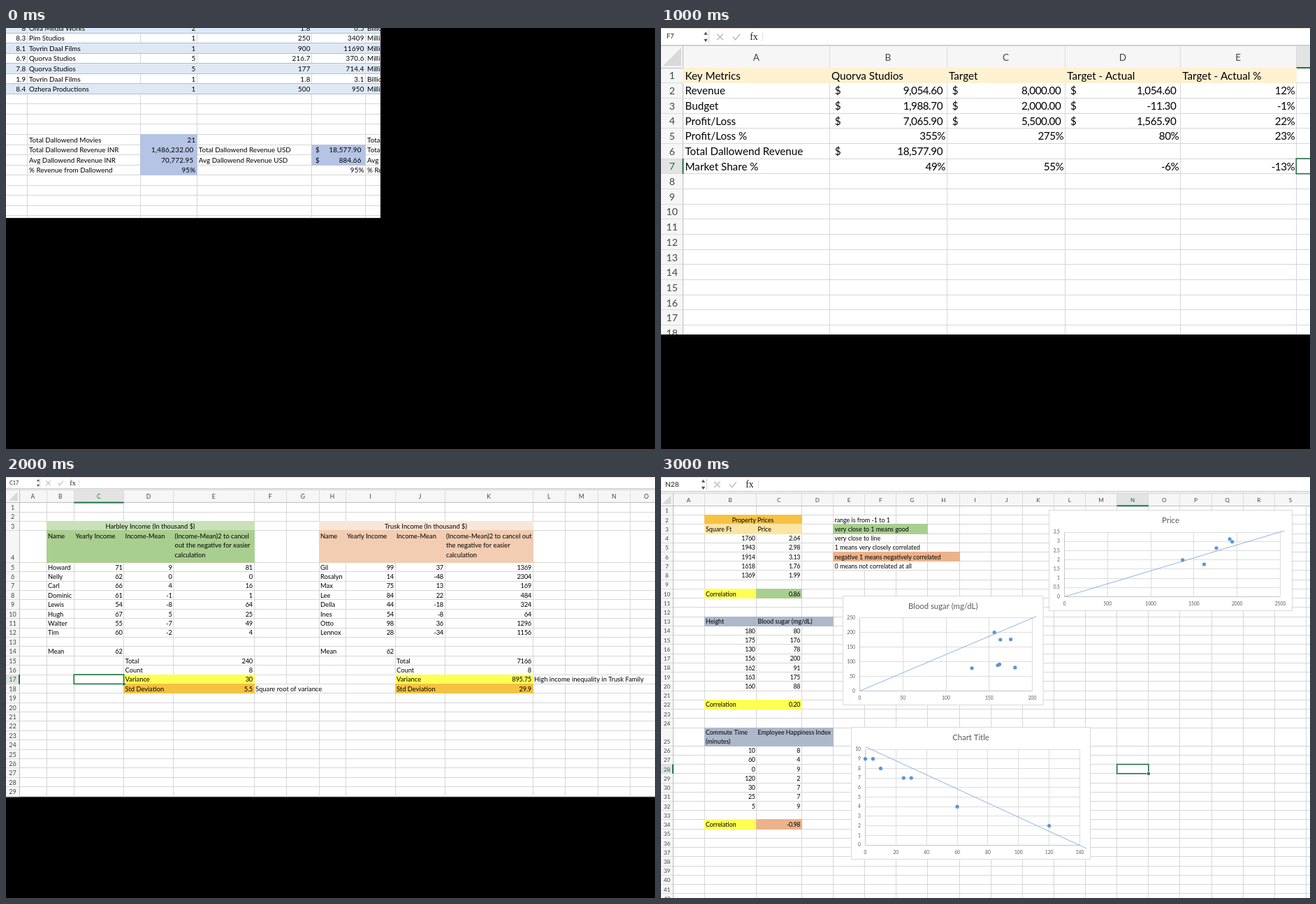
An HTML page with a canvas that plays this animation: 929 by 603 pixels, repeating every 4000 ms.

```html
<!DOCTYPE html>
<html lang="en">
<head>
<meta charset="utf-8">
<title>Spreadsheet slides</title>
<style>
html, body { margin: 0; width: 100%; height: 100%; overflow: hidden; background: #000; }
canvas { display: block; }
</style>
</head>
<body>
<canvas id="stage" width="929" height="603"></canvas>
<script>
const W = 929, H = 603;
const ctx = document.getElementById('stage').getContext('2d');
const GREEN = '#1f7244', GRID = '#d6d6d6', YELLOW = '#ffff54', AMBER = '#f5c242';
const SAGE = '#a9cf90', PEACH = '#ecb28a', SLATE = '#adb9ca';
let sheet; // geometry of the sheet being drawn

function rect(x0, y0, x1, y1, color) {
  ctx.fillStyle = color;
  ctx.fillRect(x0, y0, x1 - x0, y1 - y0);
}
const snap = v => Math.round(v - 0.5);
const hline = (x0, x1, y, color = GRID) => rect(x0, snap(y), x1, snap(y) + 1, color);
const vline = (x, y0, y1, color = GRID) => rect(snap(x), y0, snap(x) + 1, y1, color);

function path(points, color, width, fill) {
  ctx.beginPath();
  points.forEach(([x, y]) => ctx.lineTo(x, y));
  ctx.strokeStyle = ctx.fillStyle = color;
  ctx.lineWidth = width;
  fill ? ctx.fill() : ctx.stroke();
}

// y is the middle of the capitals
function text(str, x, y, size, align = 'left', color = '#000', track = 0, font = 'Lato, Carlito, sans-serif') {
  ctx.font = `${size}px ${font}`;
  ctx.letterSpacing = `${track * size}px`;
  ctx.textAlign = align;
  ctx.fillStyle = color;
  ctx.fillText(str, x, y + size * 0.36);
}

function rowEdges(top, pitch, count, tall, tallHeight) {
  const ys = [top];
  for (let r = 1; r <= count; r++) ys.push(ys[r - 1] + (r === tall ? tallHeight : pitch));
  return ys;
}

function parse(ref) {
  return [ref.charCodeAt(0) - 65, +ref.slice(1)];
}

function bounds(range) {
  const [a, b = a] = range.split(':');
  const [c0, r0] = parse(a), [c1, r1] = parse(b);
  return [sheet.xs[c0], sheet.ys[r0 - 1], sheet.xs[c1 + 1], sheet.ys[r1]];
}

function fill(range, color) {
  const [x0, y0, x1, y1] = bounds(range).map(v => snap(v));
  rect(x0, y0, x1 + 1, y1 + 1, color);
}

// hides the grid lines under text that runs over several cells
function spill(range) {
  const [x0, y0, x1, y1] = bounds(range).map(v => snap(v));
  rect(x0 + 1, y0 + 1, x1, y1, '#fff');
}

function put(ref, value, align, dx = 0) {
  const [x0, y0, x1, y1] = bounds(ref);
  const str = String(value), number = /^[\d.,%-]+$/.test(str);
  const side = align || (number ? 'right' : 'left');
  const x = { left: x0 + sheet.pad, right: x1 - 2, center: (x0 + x1) / 2 }[side] + dx;
  text(str, x, (y0 + y1) / 2 + 0.3, sheet.size, side, '#000', number ? sheet.track : 0);
}

function column(ref, values) {
  const [, row] = parse(ref);
  values.forEach((v, i) => v !== '' && put(ref[0] + (row + i), v));
}

function money(ref, value, dx) {
  put(ref, '$', 'left', dx);
  put(ref, value, 'right', -4);
}

function grid(right, bottom) {
  const { xs, ys } = sheet;
  rect(0, 0, right, bottom, '#fff');
  ys.forEach(y => hline(0, right, y));
  xs.forEach(x => vline(x, ys[0], bottom));
}

function formulaBar({ name, nameX, nameY, nameSize, k, end, step, cross, check, fx, sep, height }) {
  const mid = nameY + 0.8 * k;
  rect(0, 0, W, height, '#fff');
  rect(0, 0, W, 1, '#eadfd0');
  hline(0, W, height, '#c9c9c9');
  vline(end, 2, height - 2, '#cfcfcf');
  vline(sep, mid - 6 * k, mid + 6 * k, '#dcdcdc');
  text(name, nameX, nameY, nameSize, 'left', '#222');
  for (const d of [-1, 1]) {
    const y = mid + d * 3 * k;
    path([[step - 2.7 * k, y], [step + 2.7 * k, y], [step, y + d * 4.5 * k]], '#555', 1, true);
  }
  const a = 4.3 * k, grey = '#bcbcbc';
  path([[cross - a, mid - a], [cross + a, mid + a]], grey, 1.5 * k);
  path([[cross + a, mid - a], [cross - a, mid + a]], grey, 1.5 * k);
  path([[check - 5 * k, mid], [check - 1.5 * k, mid + 4 * k], [check + 5 * k, mid - 4 * k]], grey, 1.5 * k);
  text('fx', fx, mid - 0.5, 14 * k, 'center', '#222', 0, 'italic 14px "Liberation Serif", serif'.replace(/^italic 14px /, ''));
}

function workbook(s) {
  sheet = s;
  const { xs, ys, bar, bottom, pitch, active, headTop } = s;
  const left = xs[0], top = ys[0], [ac, ar] = parse(active);
  grid(W, bottom);
  rect(0, 0, W, top, '#f0f0f0');
  formulaBar(bar);
  rect(0, headTop, W, top, '#f6f6f6');
  rect(0, top, left, bottom, '#f6f6f6');
  rect(xs[ac], headTop, xs[ac + 1], top, '#e3e3e3');
  rect(0, ys[ar - 1], left, ys[ar], '#e3e3e3');
  hline(0, W, headTop, '#d4d4d4');
  hline(0, W, top, '#bdbdbd');
  vline(left, headTop, bottom, '#bdbdbd');
  const e = left - 2.5, b = top - 2.5, t = headTop + 3;
  path([[e, t], [e, b], [e - (b - t), b]], '#d9d9d9', 1, true);
  for (let c = 0; c < xs.length - 1; c++) {
    if (c) vline(xs[c], headTop, top, '#dcdcdc');
    text(String.fromCharCode(65 + c), (xs[c] + xs[c + 1]) / 2, (headTop + top) / 2 + 0.7,
      s.letterSize, 'center', c === ac ? GREEN : '#444');
  }
  for (let r = 1; r < ys.length; r++) {
    hline(0, left, ys[r], '#dcdcdc');
    text(r, left / 2, ys[r] - pitch / 2 + 0.4, s.rowSize, 'center', r === ar ? GREEN : '#444');
  }
  rect(xs[ac], top - 1, xs[ac + 1], top + 1, GREEN);
  rect(left - 1, ys[ar - 1], left + 1, ys[ar], GREEN);
}

function selection(ref) {
  const [x0, y0, x1, y1] = bounds(ref);
  ctx.strokeStyle = GREEN;
  ctx.lineWidth = 1.6;
  ctx.strokeRect(x0, y0, x1 - x0, y1 - y0);
  rect(x1 - 2.5, y1 - 2.5, x1 + 2.5, y1 + 2.5, '#fff');
  rect(x1 - 1.8, y1 - 1.8, x1 + 2, y1 + 2, GREEN);
}

function chart({ box, plot, title, max, step, points, trend }) {
  const [bx0, by0, bx1, by1] = box, [x0, y0, x1, y1] = plot;
  const px = v => x0 + v / max[0] * (x1 - x0), py = v => y1 - v / max[1] * (y1 - y0);
  rect(bx0, by0, bx1, by1, '#fff');
  ctx.strokeStyle = '#d9d9d9';
  ctx.lineWidth = 1;
  ctx.strokeRect(bx0, by0, bx1 - bx0, by1 - by0);
  for (let v = 0; v <= max[0]; v += step[0]) {
    vline(px(v), y0, y1, v ? '#dcdcdc' : '#c4c4c4');
    text(v, px(v), y1 + 10.2, 6.7, 'center', '#595959');
  }
  for (let v = 0; v <= max[1]; v += step[1]) {
    hline(x0, x1, py(v), v ? '#dcdcdc' : '#c4c4c4');
    text(v, x0 - 6.5, py(v) - 0.2, 6.7, 'right', '#595959');
  }
  text(title, (bx0 + bx1) / 2, by0 + 14, 11.3, 'center', '#595959');
  path(trend, '#83abdd', 0.9);
  ctx.fillStyle = '#5b95d5';
  for (const [x, y] of points) {
    ctx.beginPath();
    ctx.arc(px(x), py(y), 2.6, 0, 7);
    ctx.fill();
  }
}

function revenue() {
  const right = 536, bottom = 272.5;
  sheet = { xs: [-1, 30.5, 192.3, 273.3, 437.6, 514.6, 600], ys: rowEdges(-7.2, 14.52, 20), size: 9.85, track: 0.018, pad: 2.5 };
  ctx.beginPath();
  ctx.rect(0, 0, right, bottom);
  ctx.clip();
  grid(right, bottom);
  for (let r = 1; r <= 7; r++) {
    if (r % 2) fill(`A${r}:F${r}`, '#dfe9f5');
  }
  for (let r = 1; r <= 7; r++) hline(0, right, sheet.ys[r], '#a3c3e3');
  fill('C12:C15', '#b5c3e4');
  fill('E13:E14', '#b5c3e4');
  column('A1', [8, 8.3, 8.1, 6.9, 7.8, 1.9, 8.4]);
  column('B1', ['Olva Media Works', 'Pim Studios', 'Tovrin Daal Films', 'Quorva Studios', 'Quorva Studios',
    'Tovrin Daal Films', 'Ozhera Productions']);
  column('C1', [2, 1, 1, 5, 5, 1, 1]);
  column('D1', [1.8, 250, 900, 216.7, 177, 1.8, 500]);
  column('E1', [6.5, 3409, 11690, 370.6, 714.4, 3.1, 950]);
  column('F1', ['Billion', 'Million', 'Million', 'Million', 'Million', 'Billion', 'Million']);
  column('B12', ['Total Dallowend Movies', 'Total Dallowend Revenue INR', 'Avg Dallowend Revenue INR', '% Revenue from Dallowend']);
  put('C12', 21);
  put('C13', '1,486,232.00', 'right', -3);
  put('C14', '70,772.95', 'right', -3);
  put('C15', '95%');
  column('D13', ['Total Dallowend Revenue USD', 'Avg Dallowend Revenue USD']);
  money('E13', '18,577.90', 3);
  money('E14', '884.66', 3);
  put('E15', '95%');
  column('F12', ['Total', 'Total', 'Avg Dallowend', '% Revenue']);
}

function metrics() {
  workbook({
    xs: [31.5, 241, 409, 578.3, 743.3, 909.3, 1075], ys: rowEdges(57, 21.68, 18), pitch: 21.68, bottom: 439,
    headTop: 25, active: 'F7', size: 15.2, track: -0.029, pad: 3, letterSize: 13.6, rowSize: 14.2,
    bar: { name: 'F7', nameX: 8, nameY: 12, nameSize: 9.3, k: 1, end: 68.5, step: 64, cross: 84.5,
      check: 108, fx: 133, sep: 145, height: 24 }
  });
  fill('A1:E1', '#fdf1d0');
  ['Key Metrics', 'Quorva Studios', 'Target', 'Target - Actual', 'Target - Actual %']
    .forEach((h, i) => put('ABCDE'[i] + 1, h));
  column('A2', ['Revenue', 'Budget', 'Profit/Loss', 'Profit/Loss %', 'Total Dallowend Revenue', 'Market Share %']);
  const amounts = {
    B: ['9,054.60', '1,988.70', '7,065.90'],
    C: ['8,000.00', '2,000.00', '5,500.00'],
    D: ['1,054.60', '-11.30', '1,565.90']
  };
  for (const c in amounts) amounts[c].forEach((v, i) => money(c + (i + 2), v, 4.7));
  money('B6', '18,577.90', 4.7);
  column('B5', ['355%', '', '49%']);
  column('C5', ['275%', '', '55%']);
  column('D5', ['80%', '', '-6%']);
  column('E2', ['12%', '-1%', '22%', '23%', '', '-13%']);
  selection('F7');
}

function incomeTable(cols, family, tints, names, incomes, gaps, squares, totals) {
  const [a, b, c, d] = cols;
  fill(`${a}3:${d}3`, tints[0]);
  fill(`${a}4:${d}4`, tints[1]);
  fill(`${c}17:${d}17`, YELLOW);
  fill(`${c}18:${d}18`, AMBER);
  const [x0, , x1] = bounds(`${a}3:${d}3`);
  text(`${family} Income (In thousand $)`, (x0 + x1) / 2, 70.4, sheet.size, 'center');
  const head = (col, lines) => lines.forEach((s, i) => text(s, bounds(col + 4)[0] + 2, 84.2 + i * 13.5, sheet.size));
  head(a, ['Name']);
  head(b, ['Yearly Income']);
  head(c, ['Income-Mean']);
  head(d, ['(Income-Mean)2 to cancel', ...(a === 'B'
    ? ['out the negative for easier', 'calculation'] : ['the negative for easier', 'calculation'])]
    .map((s, i) => a === 'H' && !i ? s + ' out' : s));
  column(a + 5, [...names, '', 'Mean']);
  column(b + 5, [...incomes, '', 62]);
  column(c + 5, [...gaps, '', '', 'Total', 'Count', 'Variance', 'Std Deviation']);
  column(d + 5, [...squares, '', '', ...totals]);
}

function variance() {
  workbook({
    xs: [19, 58, 97.3, 168.6, 239.6, 355, 401.5, 448, 486, 557, 628, 754, 800.5, 847, 893.5, 940],
    ys: rowEdges(36.6, 13.4, 29, 4, 45.4), pitch: 13.4, bottom: 458.5,
    headTop: 18.5, active: 'C17', size: 9.35, track: -0.029, pad: 2, letterSize: 8.5, rowSize: 9,
    bar: { name: 'C17', nameX: 5, nameY: 8, nameSize: 7.3, k: 0.74, end: 48.5, step: 46, cross: 60.5,
      check: 78, fx: 95.5, sep: 104, height: 16 }
  });
  spill('F18:H18');
  spill('L17:O17');
  incomeTable('BCDE', 'Harbley', ['#c9e0b8', SAGE],
    ['Howard', 'Nelly', 'Carl', 'Dominic', 'Lewis', 'Hugh', 'Walter', 'Tim'],
    [71, 62, 66, 61, 54, 67, 55, 60], [9, 0, 4, -1, -8, 5, -7, -2],
    [81, 0, 16, 1, 64, 25, 49, 4], [240, 8, 30, 5.5]);
  incomeTable('HIJK', 'Trusk', ['#fae6d9', '#f2cdb2'],
    ['Gil', 'Rosalyn', 'Max', 'Lee', 'Della', 'Ines', 'Otto', 'Lennox'],
    [99, 14, 75, 84, 44, 54, 98, 28], [37, -48, 13, 22, -18, -8, 36, -34],
    [1369, 2304, 169, 484, 324, 64, 1296, 1156], [7166, 8, 895.75, 29.9]);
  put('F18', 'Square root of variance');
  put('L17', 'High income inequality in Trusk Family');
  selection('C17');
}

function correlation() {
  const xs = [17, 62, 136.5, 201];
  for (let i = 0; i <= 15; i++) xs.push(246.5 + i * 45.13);
  workbook({
    xs, ys: rowEdges(41.3, 13.24, 42, 25, 26), pitch: 13.24, bottom: H,
    headTop: 23, active: 'N28', size: 8.9, track: -0.04, pad: 2, letterSize: 8.2, rowSize: 8.4,
    bar: { name: 'N28', nameX: 6, nameY: 10, nameSize: 10.3, k: 0.98, end: 65.5, step: 60.5, cross: 80.5,
      check: 103, fx: 127, sep: 139, height: 20.5 }
  });
  fill('B2:C2', AMBER);
  fill('B3:C3', '#fce5a2');
  fill('E3:G3', SAGE);
  fill('E6:H6', PEACH);
  fill('B13:D13', SLATE);
  fill('B25:D25', SLATE);
  fill('B10', YELLOW);
  fill('C10', SAGE);
  fill('B22:C22', YELLOW);
  fill('B34', YELLOW);
  fill('C34', PEACH);
  ['E2:F2', 'E4:F4', 'E5:G5', 'E7:G7'].forEach(spill);

  const area = [1760, 1943, 1914, 1618, 1369], price = [2.64, 2.98, 3.13, 1.76, 1.99];
  const height = [180, 175, 130, 156, 162, 163, 160], sugar = [80, 176, 78, 200, 91, 175, 88];
  const commute = [10, 60, 0, 120, 30, 25, 5], mood = [8, 4, 9, 2, 7, 7, 9];
  const zip = (a, b) => a.map((v, i) => [v, b[i]]);

  text('Property Prices', 131.5, 61.6, sheet.size, 'center');
  column('B3', ['Square Ft', ...area, '', 'Correlation']);
  column('C3', ['Price', ...price, '', '0.86']);
  column('E2', ['range is from -1 to 1', 'very close to 1 means good', 'very close to line',
    '1 means very closely correlated', 'negative 1 means negatively correlated', '0 means not correlated at all']);
  column('B13', ['Height', ...height, '', 'Correlation']);
  column('C13', ['Blood sugar (mg/dL)', ...sugar, '', '0.20']);
  text('Commute Time', 64, 366, sheet.size);
  text('(minutes)', 64, 379.2, sheet.size);
  text('Employee Happiness Index', 138.5, 366, sheet.size);
  column('B26', [...commute, '', 'Correlation']);
  column('C26', [...mood, '', '-0.98']);

  chart({ box: [555.5, 47.5, 903.5, 191.5], plot: [577.5, 79, 886.5, 171.5], title: 'Price',
    max: [2500, 3.5], step: [500, 0.5], points: zip(area, price), trend: [[577.5, 171.5], [892, 77]] });
  chart({ box: [260.5, 170.5, 547, 326.5], plot: [284.5, 201.5, 531.5, 306.5], title: 'Blood sugar (mg/dL)',
    max: [200, 250], step: [50, 50], points: zip(height, sugar), trend: [[284.5, 306.5], [537.5, 199.5]] });
  chart({ box: [272.5, 358.5, 614.5, 547.5], plot: [292.5, 390, 599.5, 527], title: 'Chart Title',
    max: [140, 10], step: [20, 1], points: zip(commute, mood), trend: [[293, 386.5], [609, 532]] });
  selection('N28');
}

const scenes = [revenue, metrics, variance, correlation];
let shown = -1;

function frame() {
  const i = Math.floor(performance.now() % 4000 / 1000);
  if (i !== shown) {
    shown = i;
    rect(0, 0, W, H, '#000');
    ctx.save();
    const bottom = [272.5, 439, 458.5, H][i];
    ctx.beginPath();
    ctx.rect(0, 0, W, bottom);
    ctx.clip();
    scenes[i]();
    ctx.restore();
  }
  requestAnimationFrame(frame);
}
frame();
</script>
</body>
</html>
```
